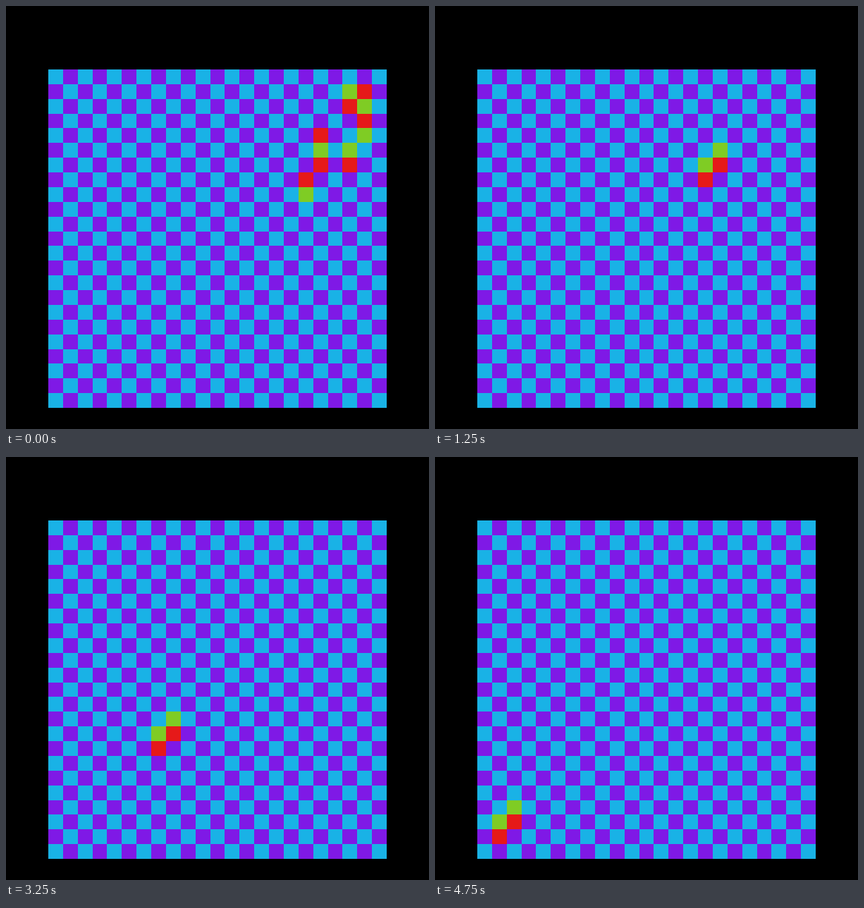
These frames come from a looping animation (600 by 600 pixels, 5 s). An HTML page:

```html
<!DOCTYPE html>
<html lang="en">
<head>
<meta charset="utf-8">
<title>Checkerboard automaton</title>
<style>
  html, body { margin: 0; width: 100%; height: 100%; overflow: hidden; background: #000; }
  svg { display: block; width: 100vw; height: 100vh; }
</style>
</head>
<body>
<svg id="stage" viewBox="0 0 600 600" shape-rendering="crispEdges"></svg>
<script>
const SIZE = 23, LEFT = 60, TOP = 90, CELL = 480 / SIZE;
const STEP_MS = 250, STEPS = 20;
const DEAD = ['#19b2e6', '#7f19e6'];
const LIVE = ['#e61919', '#7fcc24'];

const START = [
  [20, 1], [21, 1], [20, 2], [21, 2], [21, 3], [18, 4], [21, 4],
  [18, 5], [20, 5], [18, 6], [20, 6], [17, 7], [17, 8]
];
const GLIDER = [[0, 0], [-1, 1], [0, 1], [-1, 2]];

const stage = document.getElementById('stage');
const edge = (origin, i) => Math.round(origin + i * CELL);

function addCell(col, row) {
  const rect = document.createElementNS('http://www.w3.org/2000/svg', 'rect');
  const x = edge(LEFT, col), y = edge(TOP, row);
  rect.setAttribute('x', x);
  rect.setAttribute('y', y);
  rect.setAttribute('width', edge(LEFT, col + 1) - x);
  rect.setAttribute('height', edge(TOP, row + 1) - y);
  stage.append(rect);
  return rect;
}

const board = Array.from({ length: SIZE }, (_, row) =>
  Array.from({ length: SIZE }, (_, col) => addCell(col, row)));

function paint(col, row, palette) {
  board[row][col].setAttribute('fill', palette[(col + row) % 2]);
}

// The opening cluster collapses into a glider heading down-left.
function liveCells(step) {
  if (step === 0) return START;
  const cells = GLIDER.map(([dx, dy]) => [21 - step + dx, step + dy]);
  if (step === 1) cells.push([19, 6]);
  return cells;
}

let shown = -1, lit = [];
function render(ms) {
  const step = Math.floor(ms / STEP_MS) % STEPS;
  if (step === shown) return;
  shown = step;
  lit.forEach(([col, row]) => paint(col, row, DEAD));
  lit = liveCells(step);
  lit.forEach(([col, row]) => paint(col, row, LIVE));
}

board.forEach((line, row) => line.forEach((_, col) => paint(col, row, DEAD)));

const began = performance.now();
function tick() {
  render(performance.now() - began);
  requestAnimationFrame(tick);
}
tick();
</script>
</body>
</html>
```
